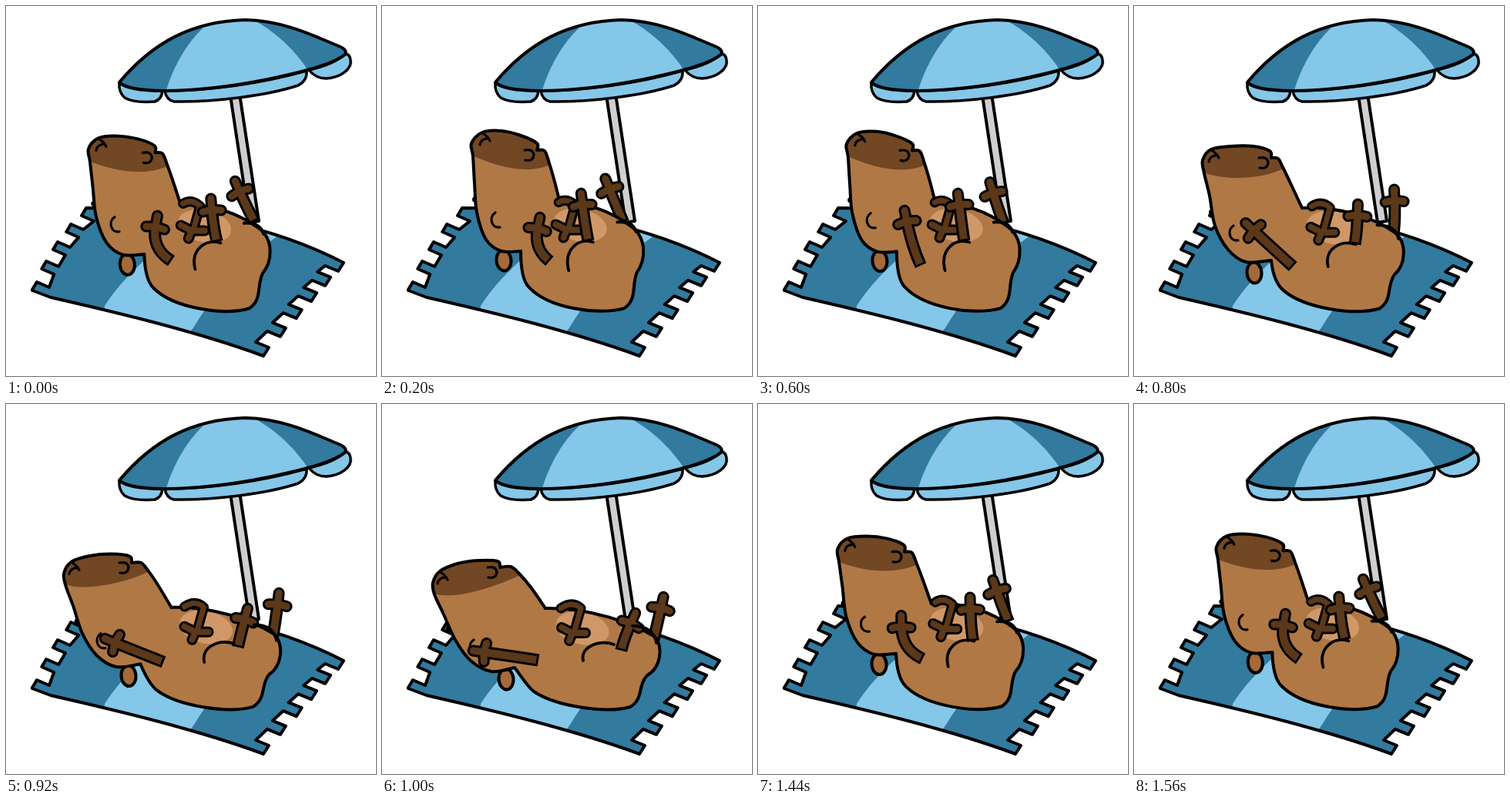
Write an HTML page with a canvas that moves like this. It is 480 by 480 pixels and loops after 2040 ms.

```html
<!DOCTYPE html>
<html lang="en">
<head>
<meta charset="utf-8">
<title>Sunbathing capybara</title>
<style>
  html, body { margin: 0; width: 100%; height: 100%; overflow: hidden; background: #fff; }
  canvas { display: block; width: 100vw; height: 100vh; }
</style>
</head>
<body>
<canvas id="stage" width="480" height="480"></canvas>
<script>
const ctx = document.getElementById('stage').getContext('2d');
const LOOP = 2040, STEP = 40;
const C = {
  line: '#000', dark: '#327a9e', light: '#85c7e8', pole: '#cfcfcf',
  fur: '#b07845', ear: '#a46a3a', mask: '#714724', limb: '#5b3819', belly: '#d09868'
};

// u: how far the body is sat up; limbs: hand x, y, angle, base x, y
const pose = {
  rest: { u: .78, arm: [194, 286, 10, 212, 329], near: [267, 264, -5, 273, 303], far: [303, 240, -24, 321, 277] },
  rise: { u: .94, arm: [202, 288, 12, 215, 329], near: [260, 257, -7, 267, 302], far: [295, 237, -22, 312, 278] },
  top:  { u: 1,   arm: [200, 281, 0, 213, 331],  near: [258, 254, -9, 266, 301], far: [299, 238, -19, 313, 278] },
  dip:  { u: .92, arm: [193, 279, -12, 210, 334], near: [261, 257, -7, 267, 302], far: [305, 242, -17, 318, 280] },
  mid:  { u: .46, arm: [155, 291, -47, 204, 336], near: [290, 271, 2, 287, 306], far: [338, 252, -2, 337, 292] },
  flat: { u: 0,   arm: [132, 322, -82, 200, 332], near: [323, 284, 24, 311, 317], far: [362, 264, 13, 353, 303] },
  lift: { u: .41, arm: [151, 299, -52, 206, 330], near: [313, 270, 15, 303, 311], far: [338, 248, 2, 337, 292] }
};
const timeline = [
  [0, 'rest'], [80, 'rest'], [200, 'rise'], [440, 'top', 1], [560, 'top'], [600, 'dip'],
  [800, 'mid'], [1000, 'flat'], [1240, 'flat'], [1280, 'lift'], [1560, 'rest', 1], [LOOP, 'rest']
];

// Head shapes at u = 0, .46 and .94
const neckKeys = [
  [212,265, 194,239, 178,220, 167,211, 153,212],
  [218,262, 204,232, 193,209, 187,198, 178,197],
  [231,256, 224,228, 217,204, 211,188, 201,187]
];
const faceKeys = [
  [153,212, 150,204, 125,203, 98,207, 75,217, 66,232, 68,247, 80,273, 95,306, 115,333, 142,347, 172,342],
  [178,197, 176,188, 155,182, 125,182, 100,186, 89,200, 91,217, 98,246, 105,285, 122,316, 145,332, 178,330],
  [201,187, 201,178, 180,168, 155,162, 130,164, 116,178, 118,195, 120,230, 123,268, 135,303, 155,318, 180,318]
];
const earKeys = [[161,357], [156,346], [158,330]];
const bodyKeys = [
  [172,342, 180,352, 188,366, 197,373, 225,392, 290,402, 322,393, 340,382, 331,366, 344,352,
   362,342, 365,315, 354,302, 325,284, 270,264, 212,265],
  [180,318, 180,345, 184,358, 190,364, 215,392, 280,402, 314,392, 331,380, 323,362, 330,345,
   340,330, 344,300, 320,284, 290,262, 262,254, 231,256]
];
const thighKeys = [
  [261,333, 257,316, 280,305, 301,312, 325,288, 352,288, 356,310],
  [241,344, 234,317, 252,300, 272,306, 304,280, 324,278, 328,292]
];

const mix = (a, b, k) => a + (b - a) * k;
const mixAll = (a, b, k) => a.map((v, i) => mix(v, b[i], k));
const blend = (keys, u) => u < .46
  ? mixAll(keys[0], keys[1], u / .46)
  : mixAll(keys[1], keys[2], (u - .46) / .48);

function paint(path, fill, width = 4) {
  if (fill) { ctx.fillStyle = fill; ctx.fill(path); }
  if (width) { ctx.strokeStyle = C.line; ctx.lineWidth = width; ctx.stroke(path); }
}

// Smooth curve through a flat list of points, continuing an existing path
function spline(path, p) {
  const n = p.length / 2;
  const at = i => { i = Math.max(0, Math.min(n - 1, i)) * 2; return [p[i], p[i + 1]]; };
  for (let i = 0; i < n - 1; i++) {
    const [a, b, c, d] = [at(i - 1), at(i), at(i + 1), at(i + 2)];
    path.bezierCurveTo(b[0] + (c[0] - a[0]) / 6, b[1] + (c[1] - a[1]) / 6,
      c[0] - (d[0] - b[0]) / 6, c[1] - (d[1] - b[1]) / 6, c[0], c[1]);
  }
}

// Evenly spaced tassels along a slightly bowed edge
function tassels(from, to, count, bow, width, depth) {
  const pts = [];
  for (let i = 0; i < count; i++) {
    const k = i / (count - 1), s = 4 * k * (1 - k);
    const x = mix(from[0], to[0], k) + s * bow[0], y = mix(from[1], to[1], k) + s * bow[1];
    if (i) pts.push([x + depth[0], y + depth[1]]);
    pts.push([x, y], [x + width[0], y + width[1]]);
    if (i < count - 1) pts.push([x + width[0] + depth[0], y + width[1] + depth[1]]);
  }
  return pts;
}

const towel = new Path2D();
towel.moveTo(104, 262);
towel.quadraticCurveTo(300, 262, 438, 333);
tassels([438, 333], [341, 443], 6, [4, -5], [-7, 11], [-17, -7]).forEach(p => towel.lineTo(...p));
towel.bezierCurveTo(250, 423, 150, 399, 58, 378);
towel.lineTo(34, 369);
tassels([104, 262], [40, 358], 5, [-5, -4], [-6, 10], [16, 7]).reverse().forEach(p => towel.lineTo(...p));
towel.closePath();
const stripe = new Path2D('M127 400 L128 389 Q165 330 270 262 L365 285 L353 298 Q290 340 240 422 L236 434Z');
const pole = new Path2D('M291 116 L316 281 L328 279 L303 114Z');
const dome = new Path2D('M147 99 C190 48 240 20 310 18 C365 19 408 43 434 53 Q441 56 441 62 C425 75 395 83 340 95 C285 106 235 110 205 110 C180 110 155 107 147 99Z');
const panel = new Path2D('M206 115 Q225 50 270 16 L313 14 Q363 38 395 88Z');
const frills = [
  'M147 100 Q146 112 154 119 Q166 126 193 124 Q202 121 203 110 Q165 109 147 100Z',
  'M206 110 Q208 122 218 124 C270 125 340 116 379 103 Q391 97 390 84 Q300 109 206 110Z',
  'M393 83 Q402 94 415 94 C434 93 449 82 447 70 Q446 63 441 62 Q425 76 393 83Z'
].map(d => new Path2D(d));

function clipFill(outline, inner, color) {
  ctx.save();
  ctx.clip(outline);
  paint(inner, color, 0);
  ctx.restore();
}

function scenery() {
  paint(towel, C.dark, 0);
  clipFill(towel, stripe, C.light);
  paint(towel, null);
  paint(pole, C.pole);
  frills.forEach(f => paint(f, C.light, 3.5));
  paint(dome, C.dark, 0);
  clipFill(dome, panel, C.light);
  paint(dome, null);
}

// Outlined limb: cross-shaped paw on a stem that bends toward its base
function paw([x, y, deg, bx, by]) {
  const a = deg * Math.PI / 180, dx = Math.sin(a), dy = -Math.cos(a);
  const len = Math.hypot(bx - x, by - y) * .6;
  const stem = new Path2D(), toes = new Path2D();
  stem.moveTo(x, y);
  stem.quadraticCurveTo(x - dx * len, y - dy * len, bx, by);
  toes.moveTo(x, y);
  toes.lineTo(x + dx * 14, y + dy * 14);
  toes.moveTo(x + dy * 12 - dx * 2, y - dx * 12 - dy * 2);
  toes.lineTo(x, y);
  toes.lineTo(x - dy * 12 - dx * 2, y + dx * 12 - dy * 2);
  const ex = bx - x + dx * len, ey = by - y + dy * len, el = Math.hypot(ex, ey) || 1;
  const cap = new Path2D();
  cap.moveTo(bx, by);
  cap.lineTo(bx + ex / el * 3, by + ey / el * 3);
  for (const [color, w] of [[C.line, 15], [C.limb, 9]]) {
    ctx.strokeStyle = color;
    ctx.lineCap = 'butt';
    ctx.lineWidth = w + 1;
    ctx.stroke(stem);
    if (color === C.line) ctx.stroke(cap);
    ctx.lineCap = 'round';
    ctx.lineWidth = w;
    ctx.stroke(toes);
  }
}

function farArm(u) {
  const x = mix(247, 239, u), y = mix(297, 290, u);
  const sleeve = new Path2D();
  sleeve.moveTo(mix(232, 229, u), mix(265, 254, u));
  sleeve.quadraticCurveTo(x, y - 42, x + 11, y - 32);
  sleeve.lineTo(x + 2, y);
  const toes = new Path2D(`M${x - 14} ${y - 7} L${x} ${y} L${x + 17} ${y}M${x} ${y} L${x - 4} ${y + 10}`);
  for (const [color, w] of [[C.line, 14], [C.limb, 8]]) {
    ctx.strokeStyle = color;
    ctx.lineWidth = w - 1;
    ctx.stroke(sleeve);
    ctx.lineWidth = w;
    ctx.stroke(toes);
  }
}

function oval(x, y, rx, ry, tilt = 0) {
  const p = new Path2D();
  p.ellipse(x, y, rx, ry, tilt, 0, 7);
  return p;
}

function capybara({ u, arm, near, far }) {
  const neck = blend(neckKeys, u), face = blend(faceKeys, u), ear = blend(earKeys, u);
  const b = mixAll(bodyKeys[0], bodyKeys[1], u), th = mixAll(thighKeys[0], thighKeys[1], u);
  const [nx, ny] = neck, [kx, ky] = face.slice(-2);
  const [sx, sy, lx, ly] = [face[0], face[1], face[8], face[9]];

  const body = new Path2D();
  body.moveTo(kx, ky);
  for (let i = 2; i < 26; i += 6) body.bezierCurveTo(...b.slice(i, i + 6));
  body.bezierCurveTo(...b.slice(26, 30), nx, ny);
  const head = new Path2D();
  head.moveTo(nx, ny);
  spline(head, neck);
  spline(head, face);

  paw(far);
  paint(oval(ear[0], ear[1], 9.5, 13.5, -.08), C.ear);
  paint(oval((face[14] + face[16]) / 2 - 1, (face[15] + face[17]) / 2 + 2, 2, 2), C.line, 3);

  paint(body, C.fur, 0);
  paint(head, C.fur, 0);
  ctx.strokeStyle = C.fur;
  ctx.lineWidth = 3;
  ctx.stroke(new Path2D(`M${nx} ${ny}L${kx} ${ky}`));
  clipFill(body, oval(mix(260, 257, u), mix(291, 284, u), 35, 21, .22), C.belly);

  // Dark muzzle
  const [mx, my, rx, ry] = [face[12], face[13], neck[4], neck[5]];
  const mask = new Path2D();
  mask.moveTo(mx - 3, my - 2);
  mask.bezierCurveTo(mx + 22, my + 9, rx - 32, ry + 18, rx + 3, ry + 1);
  mask.lineTo(rx + 20, 130);
  mask.lineTo(mx - 30, 130);
  clipFill(head, mask, C.mask);

  paint(body, null);
  paint(head, null);
  paint(new Path2D(`M${sx - 16} ${sy}Q${sx - 5} ${sy - 2} ${sx - 4} ${sy + 6}Q${sx - 5} ${sy + 15} ${sx - 15} ${sy + 13}
    M${lx - 3} ${ly + 16}Q${lx - 2} ${ly + 9} ${lx + 6} ${ly + 8}M${lx + 2} ${ly + 2}Q${lx + 8} ${ly + 6} ${lx + 10} ${ly + 11}`), null, 3.2);
  const ex = face[16] + 24, ey = face[17];
  paint(new Path2D(`M${ex} ${ey}C${ex - 9} ${ey + 6} ${ex - 5} ${ey + 21} ${ex + 6} ${ey + 19}`), null, 3.2);

  farArm(u);
  paw(near);
  const thigh = new Path2D();
  thigh.moveTo(th[0], th[1]);
  thigh.bezierCurveTo(...th.slice(2, 8));
  thigh.moveTo(th[8], th[9]);
  thigh.quadraticCurveTo(...th.slice(10));
  paint(thigh, null, 3.8);
  paw(arm);
}

function poseAt(t) {
  const i = timeline.findIndex(k => k[0] > t);
  const [t0, from] = timeline[i - 1], [t1, to, settle] = timeline[i];
  let k = (t - t0) / (t1 - t0);
  if (settle) k = k * (2 - k);
  const a = pose[from], b = pose[to];
  return {
    u: mix(a.u, b.u, k),
    arm: mixAll(a.arm, b.arm, k),
    near: mixAll(a.near, b.near, k),
    far: mixAll(a.far, b.far, k)
  };
}

const start = performance.now();
function frame() {
  const t = Math.floor(Math.max(0, performance.now() - start) % LOOP / STEP) * STEP;
  ctx.fillStyle = '#fff';
  ctx.fillRect(0, 0, 480, 480);
  ctx.lineJoin = ctx.lineCap = 'round';
  scenery();
  capybara(poseAt(t));
  requestAnimationFrame(frame);
}
frame();
</script>
</body>
</html>
```
